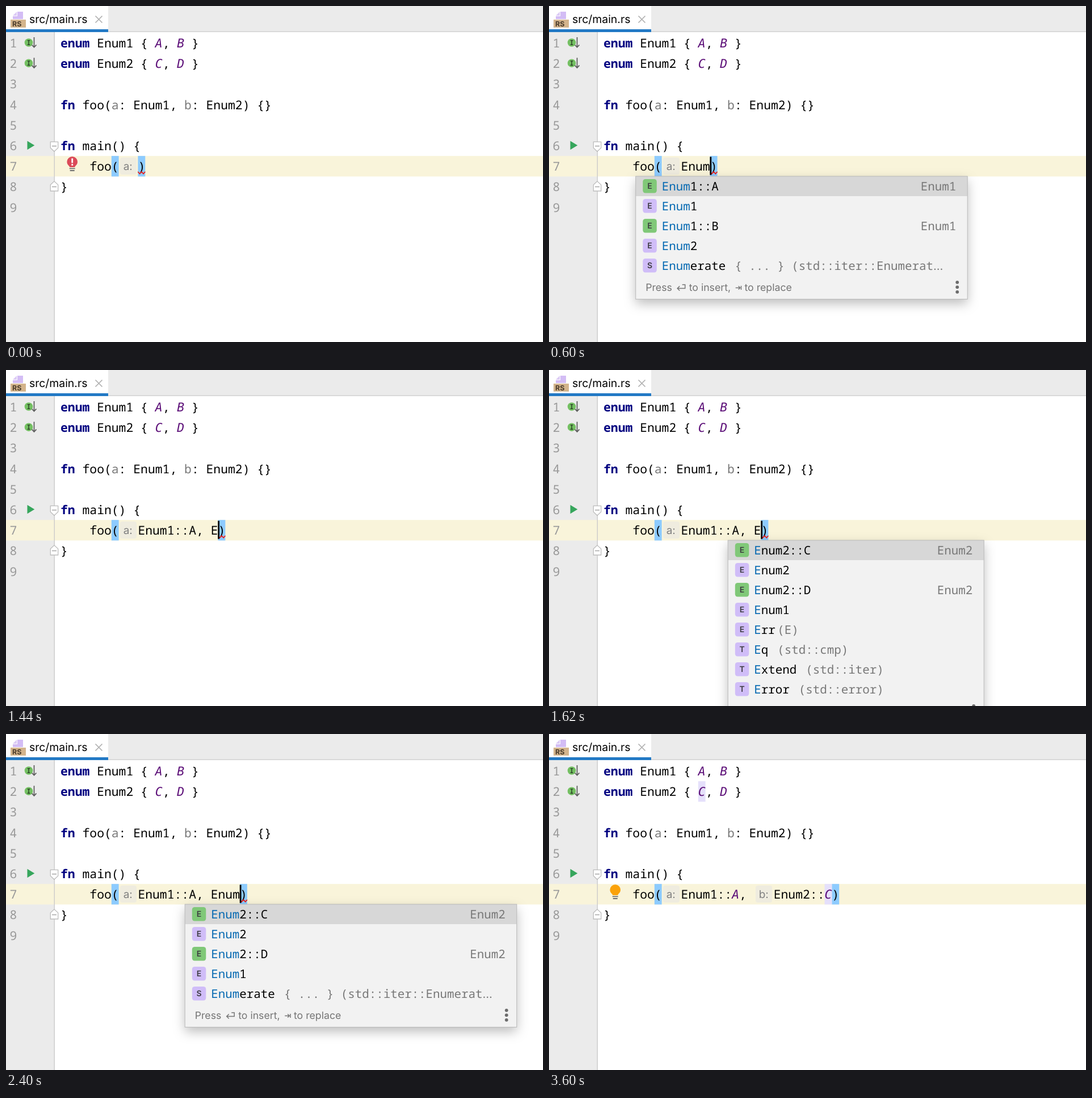
Animation, 946 px wide and 592 px high, one loop 3.9 s. Source, as an HTML page:

```html
<!DOCTYPE html>
<html lang="en">
<head>
<meta charset="utf-8">
<title>Enum completion</title>
<style>
  html, body { margin: 0; width: 100%; height: 100%; overflow: hidden; background: #fff; }
  svg { display: block; width: 946px; height: 592px; }
  text { white-space: pre; text-rendering: geometricPrecision; }
  .code { font: 21.38px "Noto Sans Mono", monospace; fill: #000; }
  .item { font: 20.83px "Noto Sans Mono", monospace; fill: #000; }
  .ui { font-family: Inter, sans-serif; }
  .key { font-weight: 700; fill: #000080; }
  .variant { font-family: "DejaVu Sans Mono", monospace; font-style: italic; fill: #5c0f78; }
  .dim { fill: #787878; }
  .num { fill: #999; }
  .match { fill: #0669b2; }
  .dots { font-family: Inter, sans-serif; font-size: 20px; }
  .popup { filter: drop-shadow(0 8px 10px rgba(0, 0, 0, .26)); }
</style>
</head>
<body>
<svg viewBox="0 0 946 592"><g id="back"></g><g id="editor"></g></svg>
<script>
const LOOP = 3900, CHAR = 12.83, ROW = 36.2, LEFT = 96, ITEM = 35, ITEM_CHAR = 12.5;
const rowTop = n => 47 + (n - 1) * ROW;

const rect = (x, y, w, h, fill, more = "") =>
  `<rect x="${x}" y="${y}" width="${w}" height="${h}" fill="${fill}" ${more}/>`;
const path = (d, stroke, width = 1.5, fill = "none") =>
  `<path d="${d}" stroke="${stroke}" stroke-width="${width}" fill="${fill}"/>`;
const circle = (x, y, r, fill) => `<circle cx="${x}" cy="${y}" r="${r}" fill="${fill}"/>`;
const span = ([text, cls = ""]) => `<tspan class="${cls}">${text}</tspan>`;
const line = (x, y, parts, cls = "code") =>
  `<text class="${cls}" x="${x}" y="${y}">${parts.map(span).join("")}</text>`;
const label = (x, y, text, size, fill, more = "") =>
  `<text class="ui" x="${x}" y="${y}" font-size="${size}" fill="${fill}" ${more}>${text}</text>`;
const codeRow = (n, parts) => line(LEFT, rowTop(n) + 26, parts);

function drawTab() {
  return rect(0, 0, 946, 45, "#ebebeb") + rect(0, 44.5, 946, 1.5, "#d2d2d2")
    + rect(0, 0, 180, 41, "#fff") + rect(0, 41, 180, 5, "#2279c5")
    + path("M20 10H30V23H12V18H20Z", "none", 0, "#d3bdf5")
    + path("M12 17L19 10V17Z", "none", 0, "#dccbf5")
    + rect(8, 24, 27, 14, "#d3b48c")
    + label(11, 35.6, "RS", 12.5, "#4a3b2a", 'font-weight="700"')
    + label(41, 30.3, "src/main.rs", 19.4, "#000")
    + path("M157.5 17.5L169.5 29.5M169.5 17.5L157.5 29.5", "#b0b0b0", 1.7);
}

function drawGutter() {
  let out = rect(0, 46, 85, 546, "#ebebeb") + rect(0, rowTop(7), 946, ROW, "#f9f4da")
    + rect(84.6, 46, 1.3, 546, "#c8c8c8");
  for (let n = 1; n <= 9; n++) out += line(6.5, rowTop(n) + 26, [[n, "num"]]);
  for (const n of [1, 2]) {
    const y = rowTop(n) + 18;
    out += circle(40, y - .5, 7.3, "#74c062")
      + path(`M37.6 ${y - 4.2}h4.8M40 ${y - 4.2}v7.4M37.6 ${y + 3.2}h4.8`, "#2f4a2a", 1.6)
      + path(`M49.5 ${y - 10}V${y + 7}M45.5 ${y + 3.5}L49.5 ${y + 7.7}L53.5 ${y + 3.5}`, "#5f5f5f", 1.8);
  }
  return out + path("M37.5 237.8L50.3 245.5L37.5 253.2Z", "none", 0, "#36a65c")
    + path("M78.3 239.3H91.7V250L85 256.3L78.3 250Z", "#bdbdbd", 1.3, "#fff")
    + path("M78.3 326H91.7V315L85 308.8L78.3 315Z", "#bdbdbd", 1.3, "#fff")
    + path("M81 246.8H89M81 318.6H89", "#a8a8a8", 1.5);
}

function drawCode() {
  const enumRow = (n, a, b) => codeRow(n, [["enum", "key"], [` Enum${n} { `],
    [a, "variant"], [", "], [b, "variant"], [" }"]]);
  return enumRow(1, "A", "B") + enumRow(2, "C", "D")
    + codeRow(4, [["fn", "key"], [" foo("], ["a", "dim"], [": Enum1, "], ["b", "dim"], [": Enum2) {}"]])
    + codeRow(6, [["fn", "key"], [" main() {"]])
    + codeRow(8, [["}"]]);
}

function drawBulb(color, alert) {
  const x = 116.7;
  return path(`M${x - 4.5} 284C${x - 5} 281 ${x - 9.3} 280 ${x - 9.3} 274.5
      A9.3 9.3 0 0 1 ${x + 9.3} 274.5C${x + 9.3} 280 ${x + 5} 281 ${x + 4.5} 284Z`, "none", 0, color)
    + path(`M${x - 5} 286.4h10M${x - 4} 290h8`, "#6e6e6e", 1.8)
    + (alert ? rect(x - 1.4, 268.5, 2.8, 8, "#fff") + rect(x - 1.4, 278.3, 2.8, 2.8, "#fff") : "");
}

const hint = (x, text) => rect(x, 267, 29, 30, "#efecdf", 'rx="4"')
  + label(x + 5.7, 288.7, text, 19, "#808080");

function drawCall({ text, caret, mark, resolved, bulb, alert }) {
  const y = rowTop(7), base = y + 26, cell = (x, n, color) => rect(x, rowTop(n), CHAR, ROW, color);
  const open = LEFT + 7 * CHAR, start = 232.4, second = start + 10 * CHAR + (resolved ? 35 : 0);
  const end = text.length > 10 ? second + (text.length - 10) * CHAR : start + text.length * CHAR;
  const style = resolved ? "variant" : "";
  let out = cell(open, 7, "#8dcbff") + cell(end, 7, "#8dcbff");
  if (mark) {
    out += cell(LEFT + 13 * CHAR, mark, "#e5e0fb") + cell(end - CHAR, 7, "#e5e0fb")
      + line(LEFT + 13 * CHAR, rowTop(mark) + 26, [[mark === 1 ? "A" : "C", "variant"]]);
  }
  out += line(LEFT + 4 * CHAR, base, [["foo("]]) + hint(201, "a:")
    + line(start, base, [[text.slice(0, 7)], [text.slice(7, 8), style], [text.slice(8, 10)]])
    + line(second, base, [[text.slice(10, 17)], [text.slice(17), style]])
    + line(end, base, [[")"]]);
  if (resolved) out += hint(364, "b:");
  else out += path(`M${end} 292l3.2 3.6l3.2-3.6l3.2 3.6l3.2-3.6`, "#e8201c", 1.8);
  if (caret) out += rect(end - .3, y + 1.5, 2.8, 32, "#000");
  if (bulb) out += drawBulb(bulb, alert);
  return out;
}

// Marks the characters of a name that match what was typed, in order.
function matched(name, typed) {
  let i = 0;
  return [...name].map(c => {
    const hit = i < typed.length && c.toLowerCase() === typed[i].toLowerCase();
    if (hit) i++;
    return [c, hit ? "match" : ""];
  });
}

function suggestions(typed, first) {
  const other = 3 - first, [a, b] = first === 1 ? "AB" : "CD";
  const list = [
    ["E", `Enum${first}::${a}`, "", `Enum${first}`], ["E", `Enum${first}`],
    ["E", `Enum${first}::${b}`, "", `Enum${first}`], ["E", `Enum${other}`]
  ];
  if (typed === "E") {
    return list.concat([["E", "Err", "(E)"], ["T", "Eq", " (std::cmp)"],
      ["T", "Extend", " (std::iter)"], ["T", "Error", " (std::error)"]]);
  }
  list.push(["S", "Enumerate", " { ... } (std::iter::Enumerat…"]);
  if (typed !== "Enum") list.push(["S", "EncodeUtf16", " { ... } (std::str::EncodeU…"]);
  if (typed === "En") {
    list.push(["S", "EncodeWide", " { ... } (std::os::EncodeWi…"], ["E", "Entry", " (std::collections::hash_map)"]);
  }
  return list;
}

function drawPopup(typed, first) {
  const x = first === 1 ? 152.7 : 315.2, top = 300;
  const items = suggestions(typed, first);
  const width = typed === "E" ? 451 : 584.5, height = items.length * ITEM + 41.5;
  const foot = top + items.length * ITEM;
  let out = `<g class="popup">${rect(x, top, width, height, "#f2f2f2")}</g>`
    + rect(x, top, width, ITEM, "#d7d7d7");
  items.forEach(([kind, name, tail = "", type], i) => {
    const y = top + i * ITEM, base = y + 24.8, cut = tail.endsWith("…");
    out += rect(x + 12.6, y + 5, 24.5, 24.5, type ? "#80c878" : "#d0bdf8", 'rx="4.5"')
      + label(x + 24.8, y + 22.4, kind, 14, "#3c3c40", 'text-anchor="middle" font-weight="600"')
      + line(x + 46, base, matched(name, typed), "item")
      + line(x + 49.5 + name.length * ITEM_CHAR, base,
        [[cut ? tail.slice(0, -1) : tail, "dim"], [cut ? "…" : "", "dim dots"]], "item");
    if (type) out += line(x + width - 20 - type.length * ITEM_CHAR, base, [[type, "dim"]], "item");
  });
  const mid = foot + 21, words = (dx, s) => label(x + dx, mid + 6.2, s, 17.7, "#757575");
  out += words(17.5, "Press") + words(94, "to insert,") + words(191.8, "to replace")
    + path(`M${x + 82} ${mid - 5}h5v6.5h-13.5M${x + 77.5} ${mid - 2.5}l-4 4l4 4`, "#757575", 1.5)
    + path(`M${x + 176} ${mid + .5}h8M${x + 181} ${mid - 2.5}l3 3l-3 3M${x + 185.8} ${mid - 3}v7`, "#757575", 1.5);
  for (const dy of [-8.5, 0, 8.5]) out += circle(x + width - 18, mid - .7 + dy, 2.9, "#6c6c6c");
  return out + rect(x, top, width, height, "none", 'stroke="#b9b9b9" stroke-width="1"');
}

const one = "Enum1::A", two = one + ", ", full = two + "Enum2::C";
const done = { mark: 2, resolved: true }, hinted = { ...done, bulb: "#fba20a" };
// start time, call arguments, popup filter, extras
const steps = [
  [0, "", "", { caret: false, bulb: "#db4a58", alert: true }],
  [60, "E"],
  [120, "E", "E"],
  [240, "En", "En"],
  [360, "Enu", "Enu"],
  [480, "Enum", "Enum"],
  [840, one],
  [900, one, "", { mark: 1 }],
  [1140, one + ","],
  [1260, two],
  [1440, two + "E"],
  [1500, two + "E", "E"],
  [1680, two + "En", "En"],
  [1860, two + "Enu", "Enu"],
  [2100, two + "Enum", "Enum"],
  [2640, full],
  [2700, full, "", { mark: 2 }],
  [2760, full, "", done],
  [3180, full, "", hinted],
  [3540, full, "", { ...hinted, caret: false }]
];

const back = document.getElementById("back"), editor = document.getElementById("editor");
back.innerHTML = drawTab() + drawGutter() + drawCode();

let shown;
const origin = performance.now();
function render() {
  const time = (performance.now() - origin) % LOOP;
  const step = steps.findLast(s => s[0] <= time);
  if (step !== shown) {
    const [, text, typed, extras] = shown = step;
    editor.innerHTML = drawCall({ text, caret: true, ...extras })
      + (typed ? drawPopup(typed, text.length < 9 ? 1 : 2) : "");
  }
  requestAnimationFrame(render);
}
render();
</script>
</body>
</html>
```
